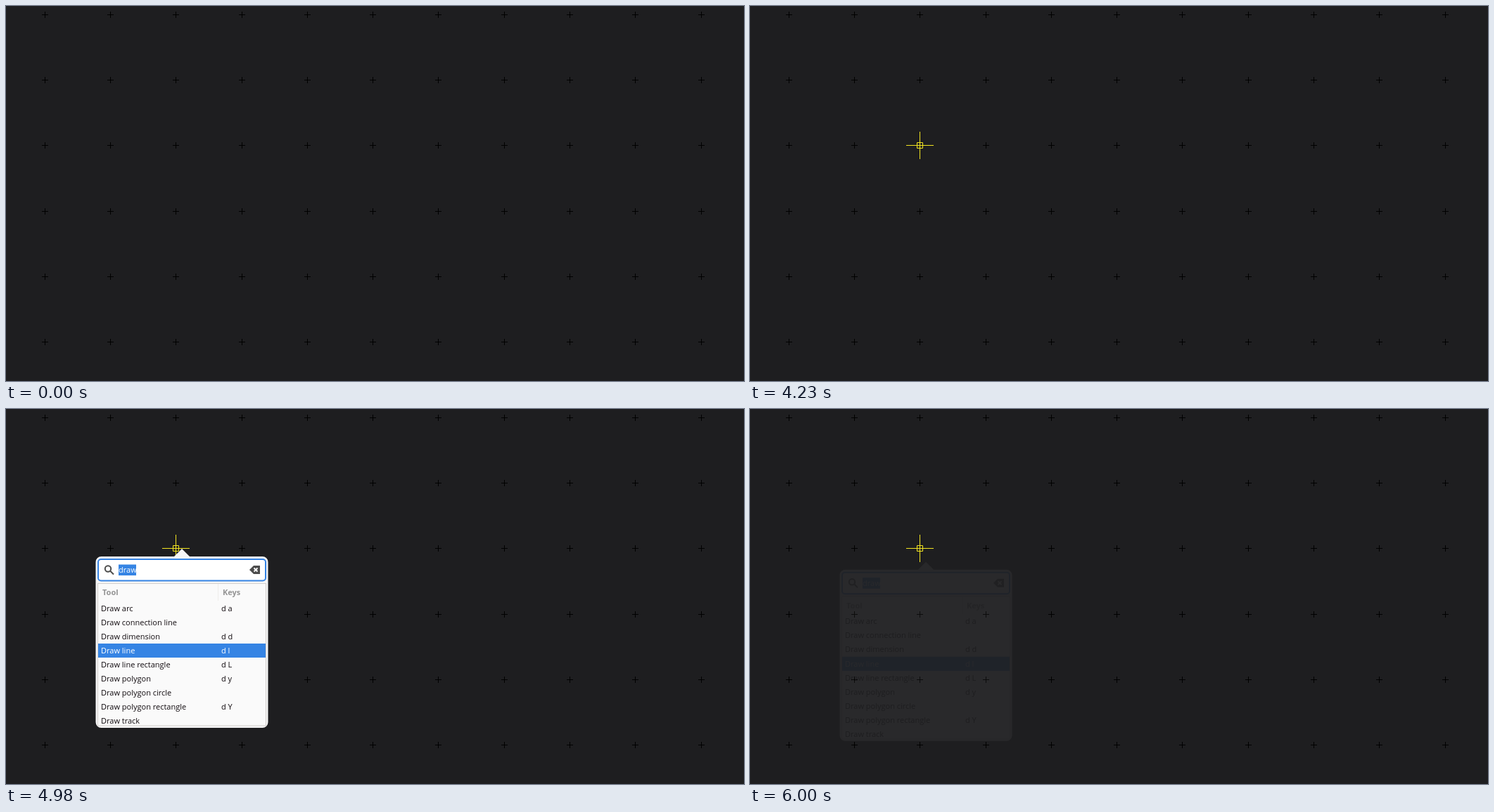
These frames come from a looping animation (1049x534 px, 8000 ms). An HTML page:

```html
<!DOCTYPE html>
<html lang="en">
<head>
<meta charset="utf-8">
<title>Tool popover</title>
<style>
  html, body { margin: 0; width: 100%; height: 100%; overflow: hidden; background: #1e1e20; }
  svg { display: block; }
  text { font: 11px "Open Sans", "Noto Sans", sans-serif; fill: #120c10; }
  .header { font-weight: bold; fill: #949494; }
  .selected { fill: #fff; }
</style>
</head>
<body>
<svg width="1049" height="534" viewBox="0 0 1049 534">
  <path id="grid" stroke="#000" fill="none"/>
  <path id="cursor" stroke="#f2e421" fill="none"
        d="M-19.5 0H19.5M0-19.5V19.5M-4-4H4V4H-4Z"/>
  <g id="popover">
    <path fill="#f6f6f6" d="M135.500 210H239L250 199L261 210H364.500a8 8 0 0 1 8 8V446a8 8 0 0 1-8 8H135.500a8 8 0 0 1-8-8V218a8 8 0 0 1 8-8Z"/>
    <rect x="131" y="214" width="238" height="30.500" rx="4" fill="#fff" stroke="#3584e4" stroke-width="2"/>
    <g fill="none" stroke="#4c4c4c" stroke-width="2">
      <circle cx="145" cy="227.500" r="4.200"/>
      <path d="M148 230.500L153 235.500"/>
    </g>
    <rect x="160" y="221.500" width="25" height="15.500" fill="#3584e4"/>
    <text class="selected" x="160" y="233">draw</text>
    <path fill="#4c4c4c" d="M346 229L352 223H361V235H352Z"/>
    <path stroke="#fff" stroke-width="1.800" d="M352.500 226.500L357.500 231.500M357.500 226.500L352.500 231.500"/>
    <rect x="130.500" y="248.500" width="239" height="202.500" fill="#fafafa" stroke="#d2cecb"/>
    <path stroke="#eeecea" d="M301.500 249V273"/>
    <text class="header" x="137" y="265">Tool</text>
    <text class="header" x="308" y="265">Keys</text>
    <rect x="131" y="334" width="238" height="20" fill="#3584e4"/>
    <g id="rows"></g>
  </g>
</svg>
<script>
const LOOP = 8000, TICK = 30, SELECTED = 3;
const TOOLS = [
  ['arc', 'd a'], ['connection line', ''], ['dimension', 'd d'],
  ['line', 'd l'], ['line rectangle', 'd L'], ['polygon', 'd y'],
  ['polygon circle', ''], ['polygon rectangle', 'd Y'], ['track', '']
];
const ENTRY = [[10, 0], [9, 0], [8, 0], [8, 1], [7, 1], [6, 1], [5, 1], [4, 2], [3, 2]];

const byId = id => document.getElementById(id);
const cursor = byId('cursor'), popover = byId('popover');
const clamp = (v, lo, hi) => Math.min(hi, Math.max(lo, v));
const gridX = col => Math.floor(55.2 + 93.29 * col) + 0.5;
const gridY = row => Math.floor(12.3 + 93.3 * row) + 0.5;

let crosses = '';
for (let row = 0; row < 6; row++)
  for (let col = 0; col < 11; col++)
    crosses += `M${gridX(col) - 4.5} ${gridY(row)}h9m-4.5-4.5v9`;
byId('grid').setAttribute('d', crosses);

byId('rows').innerHTML = TOOLS.map(([name, keys], i) => {
  const attrs = `y="${287.5 + 20.12 * i}"${i === SELECTED ? ' class="selected"' : ''}`;
  return `<text x="135" ${attrs}>Draw ${name}</text><text x="306" ${attrs}>${keys}</text>`;
}).join('');

// Snapped grid cell of the cursor, or null while it is off the canvas
function cursorCell(t) {
  const step = (start, length) => Math.floor((t - start) / length);
  if (t < 240) return null;
  if (t < 930) return ENTRY[Math.min(8, step(240, 60))];
  if (t < 3390) return [2, 2];
  if (t < 3630) return null;
  if (t < 4050) return [Math.max(5, 10 - step(3630, 48)), 2];
  return [Math.max(2, 4 - step(4050, 90)), 2];
}

function draw(t) {
  const cell = cursorCell(t);
  cursor.style.display = cell ? '' : 'none';
  if (cell) cursor.setAttribute('transform', `translate(${gridX(cell[0])} ${gridY(cell[1])})`);

  // Cubic ease-out; the fade stops short and leaves a faint trace
  const opening = (1 - clamp((t - 4812) / 150, 0, 1)) ** 3;
  const left = 1 - clamp((Math.min(t, 6000) - 5909.5) / 150, 0, 1);
  const offset = 20 * (1 - left ** 3) - 20 * opening;
  popover.setAttribute('transform', `translate(0 ${offset.toFixed(2)})`);
  popover.setAttribute('opacity', (1 - opening) * left ** 3.3);
}

function frame() {
  const t = performance.now() % LOOP;
  draw(Math.floor(t / TICK) * TICK);
  requestAnimationFrame(frame);
}
frame();
</script>
</body>
</html>
```
